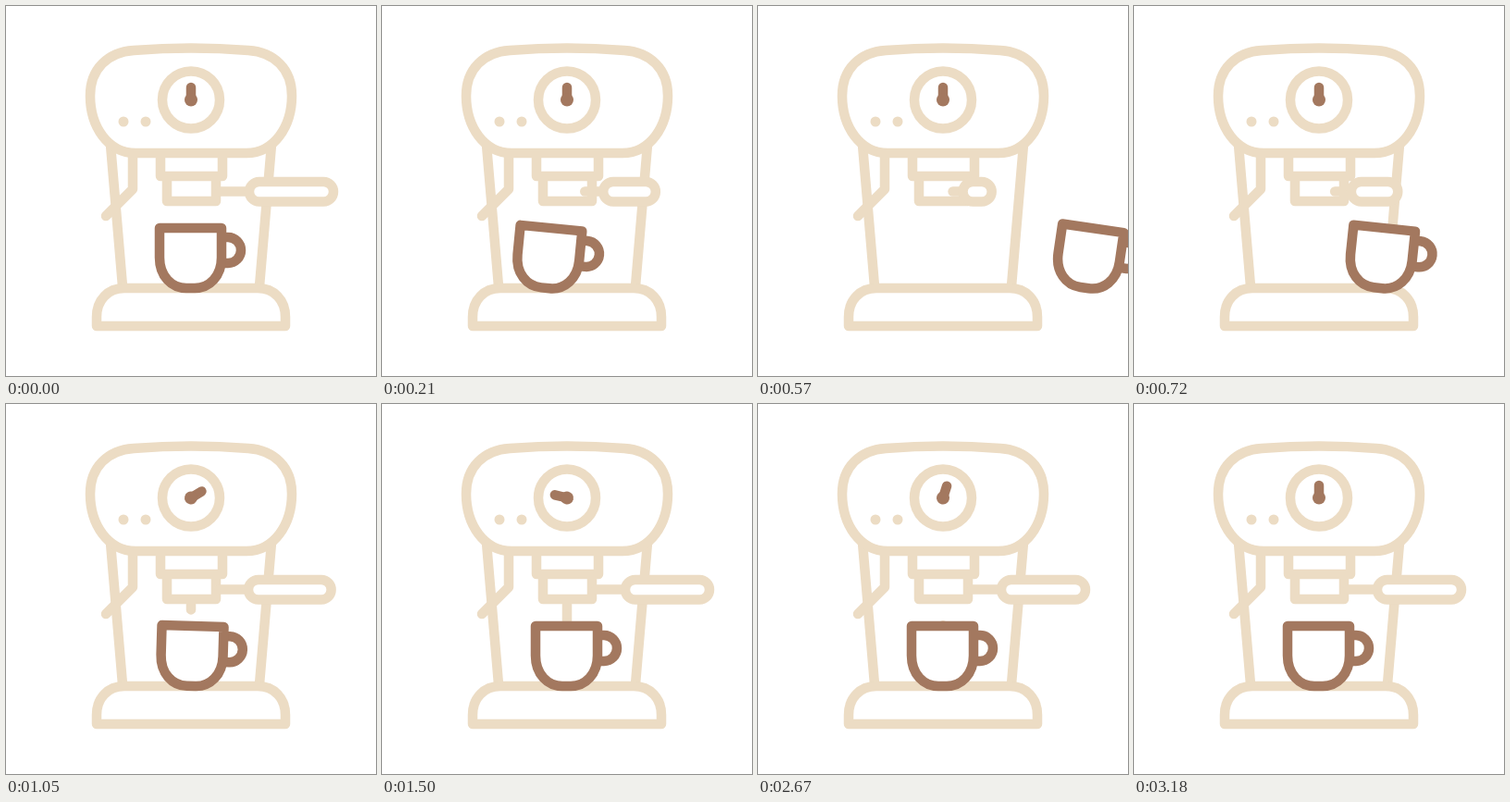
These frames come from a looping animation (400x400 px, 3270 ms). An HTML page:

```html
<!DOCTYPE html>
<html lang="en">
<head>
<meta charset="utf-8">
<title>Coffee machine</title>
<style>
  html, body { margin: 0; height: 100%; overflow: hidden; background: #fff; }
  svg { display: block; width: 100%; height: 100%; }
  .line { fill: none; stroke: #ecdcc4; stroke-width: 10.5; stroke-linecap: round; stroke-linejoin: round; }
  .solid { fill: #fff; }
  .dark { stroke: #a3785f; }
</style>
</head>
<body>
<svg viewBox="0 0 400 400">
  <defs>
    <g id="cup" class="line dark">
      <path d="M233 250H240a14 14 0 0 1 0 28H233"/>
      <path class="solid" d="M166 240H233V272C233 292 220 305 204 305H195C179 305 166 292 166 272Z"/>
    </g>
  </defs>
  <g class="line">
    <path d="M113 150L126 303M287 150L274 303"/>
    <path d="M137 160V198L108 227"/>
    <path class="solid" d="M98 346V336C98 318 110 305 128 305H272C290 305 302 318 302 336V346Z"/>
    <path id="stream" stroke-linecap="round"/>
    <path class="solid" d="M174 184V211H227V184"/>
    <path class="solid" d="M167 160V184H234V160"/>
    <path class="solid" d="M140 159H260C290 159 309 130 309 97C309 68 290 50 262 48Q200 43 138 48C110 50 91 68 91 97C91 130 110 159 140 159Z"/>
    <circle cx="200" cy="101.5" r="31"/>
    <path id="rod"/>
    <rect id="grip" class="solid" y="190" height="21.5" rx="10.7"/>
  </g>
  <g fill="#ecdcc4"><circle cx="127" cy="125" r="5.5"/><circle cx="151" cy="125" r="5.5"/></g>
  <g id="needle">
    <path class="line dark" d="M200 88V101.5"/>
    <circle cx="200" cy="101.5" r="7" fill="#a3785f"/>
  </g>
  <use id="leaving" href="#cup"/>
  <use id="arriving" href="#cup"/>
</svg>
<script>
const LOOP = 3270;
const el = id => document.getElementById(id);
const span = (t, a, b) => Math.min(1, Math.max(0, (t - a) / (b - a)));
const smooth = u => u * u * (3 - 2 * u);
const strong = u => u < .5 ? 16 * u ** 5 : 1 - 16 * (1 - u) ** 5;

function placeCup(id, dx, tilt) {
  el(id).setAttribute('transform', `translate(${dx} 0) rotate(${tilt} 200 275)`);
}

function draw(t) {
  // The cup leaves to the left and comes back from the right.
  placeCup('leaving', t < 600 ? -99 * (t / 360) ** 3 : -500, 15 * smooth(span(t, 0, 510)));
  placeCup('arriving', t < 440 ? 500 : 68 * (Math.max(0, 1180 - t) / 460) ** 3,
    8.8 * (1 - span(t, 540, 1260)) ** 1.33);

  // The handle swings towards the viewer, so its length shortens about x = 200.
  const scale = 1 - .75 * (smooth(span(t, 0, 420)) - smooth(span(t, 420, 1110)));
  const x = d => 200 + d * scale;
  el('rod').setAttribute('d', `M${x(31)} 200.5H${x(63)}`);
  el('grip').setAttribute('x', x(63));
  el('grip').setAttribute('width', 91 * scale);

  const back = strong(span(t, 1630, 3180));
  const turn = 290 * (smooth(span(t, 843, 1565)) - back);
  el('needle').setAttribute('transform', `rotate(${turn} 200 101.5)`);

  const top = 211 + 30 * back;
  const end = 211 + 30 * smooth(span(t, 900, 1260));
  el('stream').setAttribute('d', t > 900 && back < 1 ? `M200 ${top}V${end}` : '');
}

function tick() {
  draw(performance.now() % LOOP);
  requestAnimationFrame(tick);
}
tick();
</script>
</body>
</html>
```
